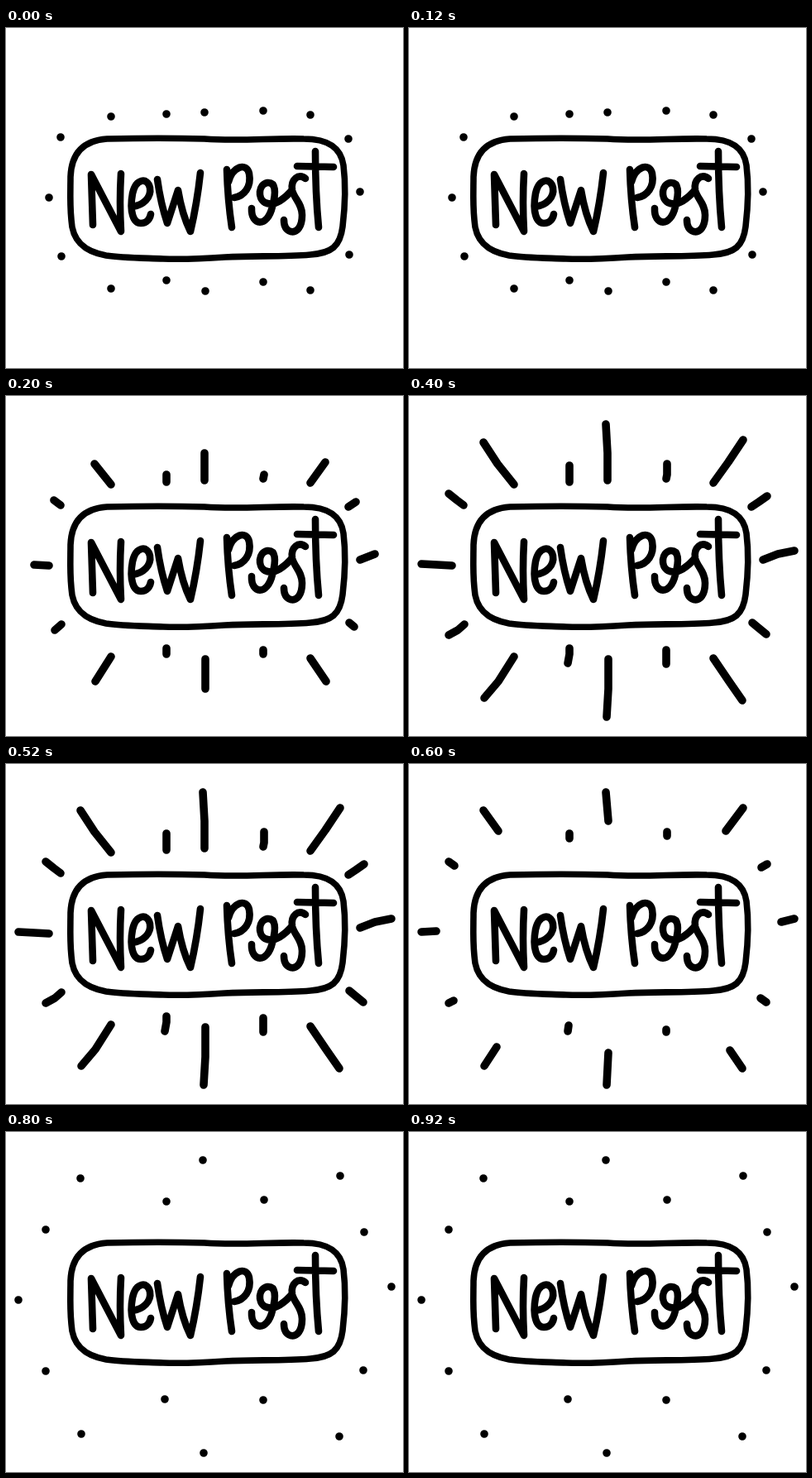
Write an HTML page that moves like this. It is 480 by 411 pixels and loops after 1000 ms.

```html
<!DOCTYPE html>
<html lang="en">
<head>
<meta charset="utf-8">
<title>New Post</title>
<style>
html, body { margin: 0; height: 100%; overflow: hidden; background: #fff; }
svg { display: block; width: 100vw; height: 100vh; }
path { fill: none; stroke: #000; stroke-linecap: round; stroke-linejoin: round; }
</style>
</head>
<body>
<svg viewBox="0 0 480 411" role="img" aria-label="New Post">
  <path id="rays" stroke-width="9.6"/>
  <path stroke-width="7.6" d="M122 134 C165 133 205 133 240 134 C280 137 320 133 360 134
    C390 134 405 145 408 166 C411 190 410 215 407 240 C404 264 394 272 368 274
    C335 277 300 275 265 277 C235 279 215 280 190 279 C165 278 140 278 121 275
    C94 270 80 257 79 232 C77 212 78 195 78 180 C79 152 93 136 122 134 Z"/>
  <g stroke-width="8.6">
    <path stroke-width="8.6" d="M105 238 L103 177 L139 246 Q137 210 139 176"/>
    <path stroke-width="8.6" d="M153 216 C166 214 176 205 174 193 C171 180 157 182 153 200
      C149 222 154 236 163 236 C170 236 174 231 175 225"/>
    <path stroke-width="8.6" d="M183 183 Q187 212 195 236 L208 196 Q213 226 223 246 Q231 212 235 175"/>
    <path stroke-width="8.6" d="M267 171 Q268 208 273 241 M269 186 C274 167 291 162 294 176
      C297 192 288 203 276 205"/>
    <path stroke-width="8.6" d="M297 218 C296 239 316 242 322 216 C327 198 326 186 316 187
      C305 189 304 206 313 211 C324 216 336 207 345 197"/>
    <path stroke-width="8.6" d="M362 182 C354 175 344 183 346 196 C348 206 358 212 358 226
      C358 240 352 248 344 246 C338 244 336 239 336 232"/>
    <path stroke-width="8.6" d="M374 149 Q374 200 378 241 M352 167 L396 168"/>
  </g>
</svg>
<script>
// Each ray: inner point, half-grown tip, outer point, half-shrunk tail
const rays = [
  [66,132, 58,126, 48,118, 55,123],
  [127,107, 107,82, 90,56, 108,81],
  [194,104, 194,95, 194,84, 194,90],
  [240,102, 240,69, 238,34, 241,69],
  [311,100, 312,95, 312,82, 312,87],
  [368,105, 386,80, 404,53, 383,81],
  [414,134, 423,128, 433,121, 426,125],
  [428,198, 446,191, 466,187, 450,191],
  [415,274, 421,279, 432,288, 425,283],
  [368,317, 387,345, 403,368, 388,346],
  [311,307, 311,312, 311,324, 311,321],
  [241,318, 241,354, 239,388, 241,349],
  [194,305, 194,312, 192,323, 193,316],
  [127,315, 108,345, 91,365, 106,342],
  [67,276, 59,283, 48,289, 54,286],
  [52,205, 34,204, 15,203, 33,202]
];
// Points joined at each step: dot, grow, full, shrink, dot
const steps = [[0, 0], [0, 1], [0, 1, 2], [3, 2], [2, 2]];
const path = document.getElementById('rays');

function draw(now) {
  const step = steps[Math.floor(now / 200) % steps.length];
  path.setAttribute('d', rays.map(ray =>
    'M' + step.map(i => ray[2 * i] + ' ' + ray[2 * i + 1]).join('L')
  ).join(''));
  requestAnimationFrame(draw);
}
draw(performance.now());
</script>
</body>
</html>
```
